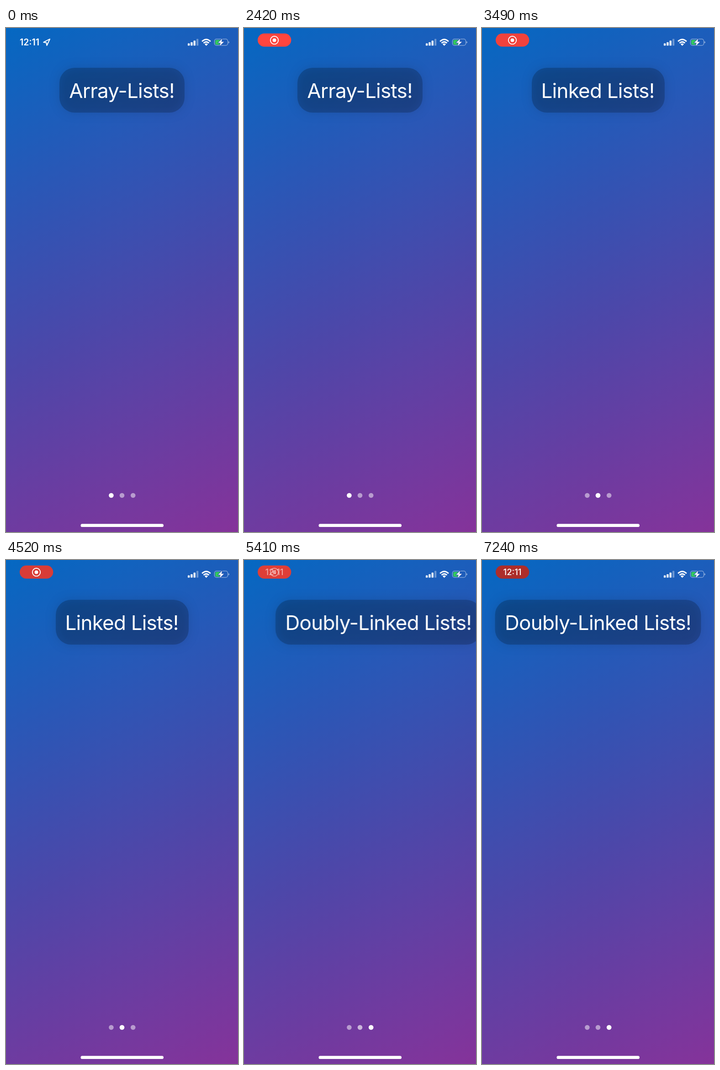
Animation, 508 px wide and 1102 px high, one loop 7.34 s. Source, as an HTML page:

```html
<!DOCTYPE html>
<html lang="en">
<head>
<meta charset="utf-8">
<title>List pages</title>
<style>
  html, body { margin: 0; width: 100%; height: 100%; overflow: hidden; background: #4848aa; }
  svg { display: block; width: 100%; height: 100%; }
  text { font-family: Inter, "Open Sans", sans-serif; fill: #fff; text-anchor: middle; }

  .pages, .pages ~ g, .pages ~ g * { animation-duration: 7340ms; animation-timing-function: linear; animation-iteration-count: infinite; }

  /* Pager: a drag to the middle, then a quick settle */
  .pages { animation-name: swipe; }
  .pages rect { fill: #000; fill-opacity: .2; filter: drop-shadow(0 0 11px rgba(0, 0, 0, .55)); }
  .pages text { font-size: 44px; letter-spacing: -.78px; }
  @keyframes swipe {
    0% { transform: translateX(0); }
    36.24% { transform: translateX(0); animation-timing-function: cubic-bezier(.4, 0, .8, .75); }
    39.92% { transform: translateX(-248px); animation-timing-function: cubic-bezier(.15, .8, .3, 1); }
    46.73%, 67.71% { transform: translateX(-508px); }
    67.71% { animation-timing-function: cubic-bezier(.4, 0, .8, .75); }
    71.39% { transform: translateX(-756px); animation-timing-function: cubic-bezier(.15, .8, .3, 1); }
    78.2%, 100% { transform: translateX(-1016px); }
  }

  /* Page dots */
  .dots circle { fill: #fff; }
  .dots .one { animation-name: one; }
  .dots .two { animation-name: two; }
  .dots .three { animation-name: three; }
  @keyframes one { 0%, 40.33% { opacity: 1; } 42.92%, 100% { opacity: .5; } }
  @keyframes two { 0%, 40.33% { opacity: .5; } 42.2%, 71.53% { opacity: 1; } 74.5%, 100% { opacity: .5; } }
  @keyframes three { 0%, 71.53% { opacity: .5; } 73.6%, 100% { opacity: 1; } }

  /* Clock, then the recording pill */
  .clock { animation-name: leave; }
  .clock text { font-size: 19.5px; font-weight: 600; }
  .pill { animation-name: appear; }
  .pill rect { animation-name: grow, glow; transform-origin: 66.5px 26.5px; }
  .pill .icon { animation-name: iconOut; }
  .pill text { animation-name: timeIn; font-size: 18.5px; font-weight: 500; }
  @keyframes leave { 0%, 9.26% { opacity: 1; } 11.17%, 100% { opacity: 0; } }
  @keyframes appear { 0%, 9.81% { opacity: 0; } 13.08%, 100% { opacity: 1; } }
  @keyframes grow { 0%, 9.81% { transform: scale(.72); } 13.08%, 100% { transform: scale(1); } }
  @keyframes glow {
    0%, 40.87% { fill: #ff453e; }
    61.58% { fill: #d83c37; }
    73.71% { fill: #df3e37; }
    98.64%, 100% { fill: #ad2d2a; }
  }
  @keyframes iconOut { 0%, 72.2% { opacity: 1; } 75.07%, 100% { opacity: 0; } }
  @keyframes timeIn { 0%, 72.2% { opacity: 0; } 75.07%, 100% { opacity: 1; } }
</style>
</head>
<body>
<svg viewBox="0 0 508 1102" preserveAspectRatio="none">
  <defs>
    <linearGradient id="sky" gradientUnits="userSpaceOnUse" x1="0" y1="0" x2="508" y2="1102">
      <stop offset="0" stop-color="#0568c2"/>
      <stop offset=".27" stop-color="#2858b7"/>
      <stop offset=".57" stop-color="#4d47a9"/>
      <stop offset="1" stop-color="#85339a"/>
    </linearGradient>
  </defs>
  <rect width="508" height="1102" fill="url(#sky)"/>

  <g class="pages">
    <rect x="117" y="87" width="274" height="98" rx="33"/>
    <text x="253.5" y="153">Array-Lists!</text>
    <rect x="617" y="87" width="291" height="98" rx="33"/>
    <text x="761.5" y="153">Linked Lists!</text>
    <rect x="1044.5" y="87" width="451" height="98" rx="33"/>
    <text x="1270" y="153">Doubly-Linked Lists!</text>
  </g>

  <g class="dots">
    <circle class="one" cx="230.4" cy="1022" r="5.3"/>
    <circle class="two" cx="254" cy="1022" r="5.3"/>
    <circle class="three" cx="278.2" cy="1022" r="5.3"/>
  </g>
  <rect x="163.5" y="1084.3" width="181.5" height="6.8" rx="3.4" fill="#fff"/>

  <g class="clock">
    <text x="51.5" y="38.3">12:11</text>
    <path d="M82.2 31.2L96 24.2L89.4 38.2L88.3 32Z" fill="none" stroke="#fff" stroke-width="2" stroke-linejoin="round"/>
  </g>

  <g class="pill">
    <rect x="30" y="12" width="73.3" height="28.8" rx="14.4"/>
    <g class="icon">
      <circle cx="66.5" cy="26.7" r="8.7" fill="none" stroke="#fff" stroke-width="1.9"/>
      <circle cx="66.5" cy="26.7" r="3.9" fill="#fff"/>
    </g>
    <text x="66.5" y="33.2">12:11</text>
  </g>

  <!-- signal, wireless, battery -->
  <g fill="#fff">
    <rect x="398" y="33.6" width="4.3" height="5" rx="1.2"/>
    <rect x="404.3" y="31" width="4.3" height="7.6" rx="1.2"/>
    <rect x="410.6" y="27.5" width="4.3" height="11.1" rx="1.2"/>
    <rect x="417" y="23.8" width="4.3" height="14.8" rx="1.2" opacity=".35"/>
    <path d="M438.5 39L434.9 35.3Q438.5 32.4 442.1 35.3Z"/>
  </g>
  <g fill="none" stroke="#fff" stroke-width="3">
    <path d="M429.2 29.3Q438.5 20.7 447.8 29.3"/>
    <path d="M432.6 33Q438.5 27.7 444.4 33"/>
  </g>
  <rect x="456.4" y="24.2" width="29.2" height="14" rx="4.4" fill="none" stroke="#fff" stroke-opacity=".5" stroke-width="1.3"/>
  <path d="M487 29Q488.9 29.4 488.9 31.2Q488.9 33 487 33.4Z" fill="#fff" opacity=".55"/>
  <path d="M461 26H470V36.4H461Q458.2 36.4 458.2 33.6V28.8Q458.2 26 461 26Z" fill="#34c95c"/>
  <path d="M473.4 23.6L464.6 32.3H469.8L467.9 39.2L477 30.2H471.6Z" fill="#fff" stroke="#2a59b4" stroke-width="2.2" stroke-linejoin="round" paint-order="stroke"/>
</svg>
</body>
</html>
```
